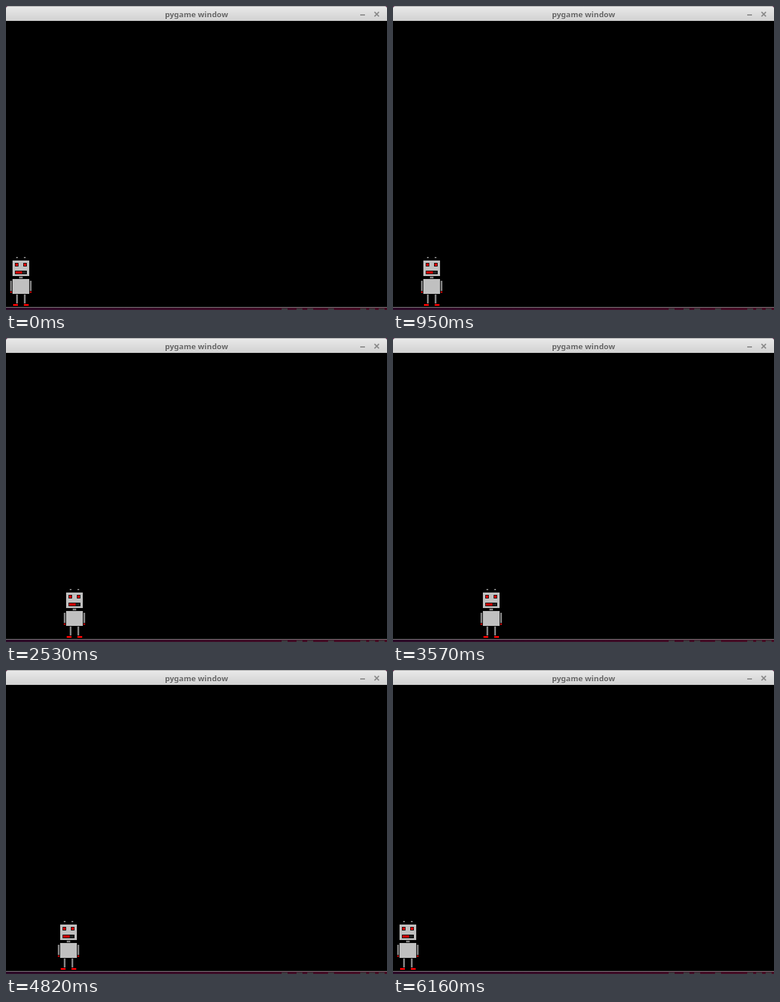
An HTML page that plays this animation: 640x510 px, repeating every 9800 ms.

```html
<!DOCTYPE html>
<html lang="en">
<head>
<meta charset="utf-8">
<title>pygame window</title>
<style>
  html, body { margin: 0; width: 100%; height: 100%; overflow: hidden; background: #000; }
  svg { display: block; width: 640px; height: 510px; }
  .title { font: bold 13px "Noto Sans", "Open Sans", sans-serif; text-anchor: middle; }
</style>
</head>
<body>
<svg viewBox="0 0 640 510">
  <defs>
    <linearGradient id="bar" x1="0" y1="0" x2="0" y2="1">
      <stop offset="0" stop-color="#e9e9e9"/>
      <stop offset="1" stop-color="#d1d1d1"/>
    </linearGradient>
    <linearGradient id="desk">
      <stop offset="0" stop-color="#2b0a27"/>
      <stop offset=".5" stop-color="#3a0b26"/>
      <stop offset="1" stop-color="#470d24"/>
    </linearGradient>
  </defs>

  <rect width="640" height="510" fill="#000"/>
  <rect width="640" height="8" fill="#5a1440"/>
  <path d="M0 25V4Q0 0 4 0H636Q640 0 640 4V25Z" fill="#a5a5a5"/>
  <path d="M0 25V5Q0 1 4 1H636Q640 1 640 5V25Z" fill="url(#bar)"/>
  <text class="title" x="320" y="20" fill="#f4f4f4">pygame window</text>
  <text class="title" x="320" y="19" fill="#666">pygame window</text>
  <path d="M595 15H603" stroke="#8a8a8a" stroke-width="2"/>
  <path d="M619 10L626.5 17.5M626.5 10L619 17.5" stroke="#8a8a8a" stroke-width="2"/>

  <rect y="505" width="640" height="1" fill="#8c8c8c"/>
  <rect y="506" width="640" height="4" fill="url(#desk)"/>
  <g id="smudges" fill="#3c3a3e"></g>
  <g id="robot" shape-rendering="crispEdges"></g>
</svg>
<script>
const LOOP = 9800;
const SILVER = '#c0c0c0', GRAY = '#808080', RED = '#f00', BLACK = '#000';
const robot = document.getElementById('robot');
const smudges = document.getElementById('smudges');

function box(parent, x, y, w, h, fill) {
  const r = document.createElementNS('http://www.w3.org/2000/svg', 'rect');
  const attrs = { x, y, width: w, height: h };
  if (fill) attrs.fill = fill;
  for (const k in attrs) r.setAttribute(k, attrs[k]);
  parent.append(r);
}
const part = (...args) => box(robot, ...args);

for (const x of [463, 488, 506, 541, 595, 610, 626]) box(smudges, x, 507, 10, 3);

// Head
for (const x of [17, 30]) part(x, 421, 3, 2, GRAY);
part(11, 427, 28, 26, SILVER);
for (const x of [15, 29]) {
  part(x, 431, 6, 6, BLACK);
  part(x + 1, 432, 4, 4, RED);
}
part(15, 444, 20, 6, BLACK);
part(16, 445, 11, 4, '#900');
for (let x = 16; x < 34; x += 2) part(x, 445, 1, 4, x < 27 ? RED : '#484848');
part(22, 454, 6, 3, GRAY);

// Body and limbs
part(11, 458, 28, 25, SILVER);
for (const x of [7, 40]) {
  part(x, 461, 3, 17, GRAY);
  part(x, 479, 3, 2, '#d00');
}
for (const x of [17, 30]) part(x, 484, 3, 15, GRAY);
for (const x of [12, 30]) part(x, 500, 8, 3, RED);

// Each walk: direction (+1 right, -1 left) and the times of its 10 px steps
const walks = [
  [+1, [220, 360, 500, 650, 800]],
  [-1, [950, 1090]],
  [+1, [1230, 1420, 1510, 1650, 1840, 1930]],
  [-1, [2080, 2240]],
  [+1, [2390, 2530, 2710, 2800, 2940, 3070, 3570, 3710]],
  [-1, [3980, 4120, 4260, 4400, 4540, 4680, 4820, 4960,
        5100, 5240, 5370, 5510, 5650, 5790, 6160]]
];

let x = 0;
const pose = t => ({ offset: t / LOOP, transform: `translateX(${x}px)`, easing: 'step-end' });
const frames = [pose(0)];
for (const [dir, times] of walks)
  for (const t of times) {
    x += dir * 10;
    frames.push(pose(t));
  }
frames.push(pose(LOOP));
robot.animate(frames, { duration: LOOP, iterations: Infinity });
</script>
</body>
</html>
```
